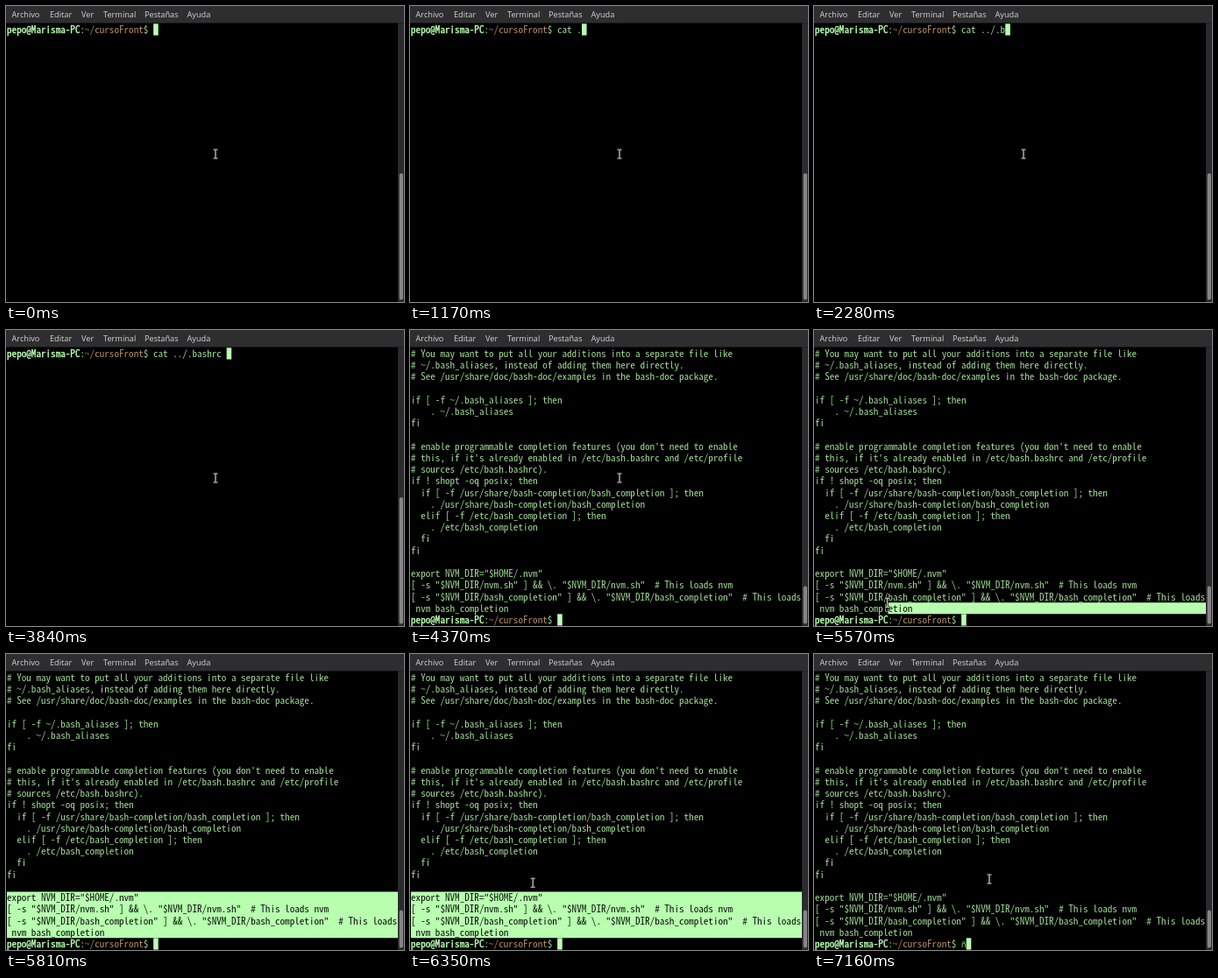
These frames come from a looping animation (454x338 px, 7220 ms). An HTML page with a canvas:

```html
<!DOCTYPE html>
<html lang="es">
<head>
<meta charset="utf-8">
<title>Terminal</title>
<style>
html, body { margin: 0; width: 100%; height: 100%; overflow: hidden; background: #000; }
canvas { display: block; }
</style>
</head>
<body>
<canvas id="stage" width="454" height="338"></canvas>
<script>
const ctx = document.getElementById('stage').getContext('2d');
const W = 454, H = 338, LOOP = 7220;
const LEFT = 1, TOP = 20.3, CELL = 5.565, ROW = 13.22, COLS = 80;
const FG = '#a0da96', BRIGHT = '#b8ffb0', PATH = '#b38f68';
const FAMILY = '"Noto Sans Mono CJK JP", "Noto Sans Mono CJK SC", "Noto Sans Mono", monospace';
const ACCENTED = '"Noto Sans Mono", "DejaVu Sans Mono", monospace';

const USER = 'pepo@Marisma-PC', DIR = '~/cursoFront';
const PROMPT_COLS = USER.length + DIR.length + 3;
const OUTPUT = String.raw`# You may want to put all your additions into a separate file like
# ~/.bash_aliases, instead of adding them here directly.
# See /usr/share/doc/bash-doc/examples in the bash-doc package.

if [ -f ~/.bash_aliases ]; then
    . ~/.bash_aliases
fi

# enable programmable completion features (you don't need to enable
# this, if it's already enabled in /etc/bash.bashrc and /etc/profile
# sources /etc/bash.bashrc).
if ! shopt -oq posix; then
  if [ -f /usr/share/bash-completion/bash_completion ]; then
    . /usr/share/bash-completion/bash_completion
  elif [ -f /etc/bash_completion ]; then
    . /etc/bash_completion
  fi
fi

export NVM_DIR="$HOME/.nvm"
[ -s "$NVM_DIR/nvm.sh" ] && \. "$NVM_DIR/nvm.sh"  # This loads nvm
[ -s "$NVM_DIR/bash_completion" ] && \. "$NVM_DIR/bash_completion"  # This loads
 nvm bash_completion`.split('\n');

const COMMAND = 'cat ../.bashrc ';
// [time, characters typed]
const KEYS = [[510, 1], [690, 2], [870, 3], [1050, 4], [1170, 5], [1320, 6], [1600, 7],
  [1950, 8], [2280, 9], [2430, 10], [2700, 11], [3170, 12], [3660, 13], [3780, 15]];
const RUN = 4370, PRESS = 5380, RELEASE = 5880, DESELECT = 6500, LAST_KEY = 7160;
const LAST_ROW = OUTPUT.length - 1;

// [time, x, y]
const POINTER = [[4820, 239, 169], [5250, 128, 322], [5380, 118, 319], [5570, 84, 311.5],
  [5660, 42, 300], [5790, -4, 281], [5960, -4, 276], [6290, 130, 262], [6710, 200, 257]];

// The font size whose advance equals one terminal cell.
function cellSize(family) {
  ctx.font = `100px ${family}`;
  return 100 * CELL / ctx.measureText('n').width;
}
const FONT = `${cellSize(FAMILY)}px ${FAMILY}`;
const ACCENTED_FONT = `${cellSize(ACCENTED)}px ${ACCENTED}`;

const colX = col => LEFT + col * CELL;
const rowY = row => TOP + row * ROW;
const clamp = (v, lo, hi) => Math.min(hi, Math.max(lo, v));

function rect(x, y, w, h, color) {
  ctx.fillStyle = color;
  ctx.fillRect(x, y, w, h);
}

function text(str, col, row, color = FG, { font = FONT, outline = 0 } = {}) {
  const x = colX(col), y = rowY(row) + 10.6;
  ctx.font = font;
  ctx.fillStyle = ctx.strokeStyle = color;
  ctx.fillText(str, x, y);
  if (outline) {
    ctx.lineWidth = outline;
    ctx.strokeText(str, x, y);
  }
}

function pointerAt(t) {
  const next = POINTER.findIndex(p => p[0] > t);
  if (next < 0) return POINTER[POINTER.length - 1].slice(1);
  if (next === 0) return POINTER[0].slice(1);
  const [t0, x0, y0] = POINTER[next - 1], [t1, x1, y1] = POINTER[next];
  const k = (t - t0) / (t1 - t0);
  return [x0 + (x1 - x0) * k, y0 + (y1 - y0) * k];
}

function drawMenu() {
  rect(0, 0, W, 19.5, '#2e2d2f');
  ctx.font = '500 9.2px "Open Sans", "Noto Sans", sans-serif';
  ctx.fillStyle = '#d6d6d4';
  const items = { Archivo: 6.5, Editar: 50, Ver: 86, Terminal: 111, Pestañas: 158, Ayuda: 206.5 };
  for (const [label, x] of Object.entries(items)) ctx.fillText(label, x, 13.3);
}

function drawScrollbar(top) {
  rect(447, 19.5, 7, H - 19.5, '#2b2a2c');
  ctx.fillStyle = '#858585';
  ctx.beginPath();
  ctx.roundRect(448.7, top, 4.3, 335.5 - top, 2.1);
  ctx.fill();
}

function drawPrompt(row, typed, font) {
  text(USER, 0, row, BRIGHT, { outline: 0.4 });
  text(':', USER.length, row);
  text(DIR, USER.length + 1, row, PATH);
  text('$', USER.length + DIR.length + 1, row);
  text(typed, PROMPT_COLS, row, FG, { font });
  rect(colX(PROMPT_COLS + typed.length) + 0.2, rowY(row), CELL, ROW, BRIGHT);
}

function drawSelection(t) {
  const [x, y] = pointerAt(Math.min(t, RELEASE));
  const first = clamp(Math.floor((y - TOP) / ROW), 0, LAST_ROW);
  const col = clamp(Math.round((x - LEFT) / CELL), 0, COLS);
  ctx.save();
  ctx.beginPath();
  ctx.rect(colX(col), rowY(first), 447 - colX(col), ROW);
  ctx.rect(LEFT, rowY(first + 1), 447 - LEFT, (LAST_ROW - first) * ROW);
  ctx.clip();
  rect(0, 0, W, H, BRIGHT);
  for (let row = first; row <= LAST_ROW; row++) text(OUTPUT[row], 0, row, '#0a120a');
  ctx.restore();
}

function drawPointer([x, y]) {
  const beam = (width, color) => {
    ctx.strokeStyle = color;
    ctx.lineWidth = width;
    ctx.beginPath();
    for (const s of [-1, 1]) {
      ctx.moveTo(x - 2.5, y + s * 5);
      ctx.lineTo(x + 2.5, y + s * 5);
    }
    ctx.moveTo(x, y - 5);
    ctx.lineTo(x, y + 5);
    ctx.stroke();
  };
  beam(2.6, '#1c1c1c');
  beam(1.2, '#c4c4c4');
}

function draw(t) {
  rect(0, 0, W, H, '#000');
  drawMenu();
  if (t < RUN) {
    const count = KEYS.reduce((n, [at, chars]) => t >= at ? chars : n, 0);
    drawPrompt(0, COMMAND.slice(0, count));
  } else {
    OUTPUT.forEach((line, row) => text(line, 0, row));
    if (t >= PRESS && t < DESELECT) drawSelection(t);
    drawPrompt(LAST_ROW + 1, t >= LAST_KEY ? 'ñ' : '', ACCENTED_FONT);
  }
  drawScrollbar(t < RUN ? 191 : 292.5);
  drawPointer(pointerAt(t));
}

const start = performance.now();
function frame() {
  draw((performance.now() - start) % LOOP);
  requestAnimationFrame(frame);
}
frame();
</script>
</body>
</html>
```
